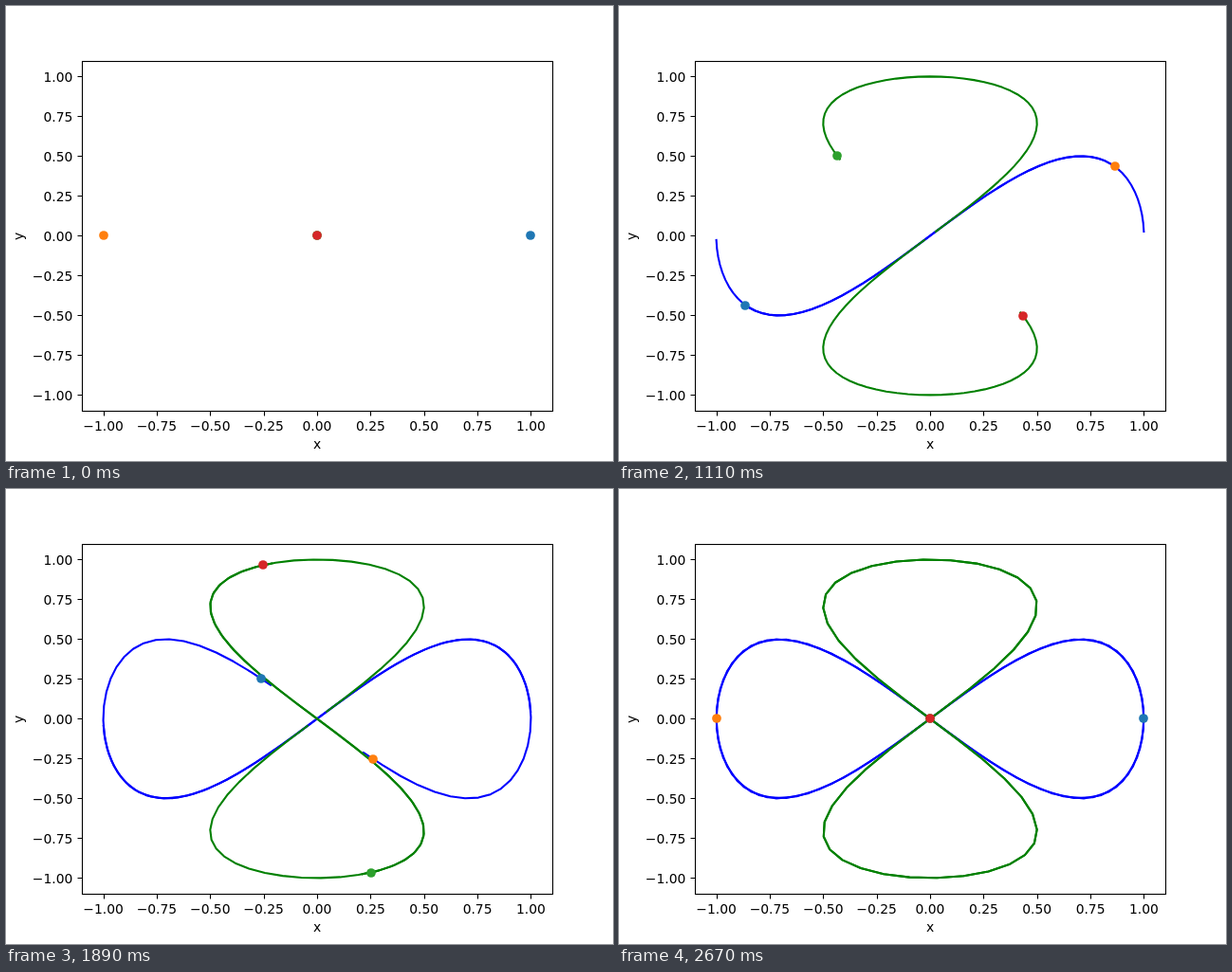
Animation of 640 by 480 pixels, one loop 2700 ms. Source, as an HTML page:

```html
<!DOCTYPE html>
<html lang="en">
<head>
<meta charset="utf-8">
<title>Crossing figure-eight orbits</title>
<style>
  html, body { margin: 0; width: 100%; height: 100%; overflow: hidden; background: #fff; }
  svg { display: block; }
  text { font: 13.889px "DejaVu Sans", sans-serif; fill: #000; }
  .axes { fill: none; stroke: #000; stroke-width: 1.111; }
  .trail { fill: none; stroke-width: 2.083; stroke-linejoin: round; stroke-linecap: square; }
</style>
</head>
<body>
<svg id="plot" width="640" height="480" viewBox="0 0 640 480">
  <path class="axes" id="ticks"/>
  <g id="trails"></g>
  <rect class="axes" x="80.5" y="58.5" width="496" height="369"/>
  <g id="dots"></g>
  <g id="labels">
    <text x="328" y="467" text-anchor="middle">x</text>
    <text transform="translate(18 243) rotate(-90)" text-anchor="middle">y</text>
  </g>
</svg>
<script>
const FRAMES = 90, FRAME_MS = 30, SEGMENTS = 49;
const $ = id => document.getElementById(id);
const px = x => 328 + x * 496 / 2.2;
const py = y => 242.4 - y * 168;

function add(parent, name, attrs, text = '') {
  const el = document.createElementNS('http://www.w3.org/2000/svg', name);
  for (const key in attrs) el.setAttribute(key, attrs[key]);
  el.textContent = text;
  return $(parent).appendChild(el);
}

function drawAxes() {
  let d = '';
  for (let i = -4; i <= 4; i++) {
    const v = i / 4;
    const label = (v < 0 ? '\u2212' : '') + Math.abs(v).toFixed(2);
    const x = Math.round(px(v)) + 0.5, y = Math.round(py(v)) + 0.5;
    d += `M${x} 427.5V432.5M80.5 ${y}H75.5`;
    add('labels', 'text', { x: px(v), y: 448, 'text-anchor': 'middle' }, label);
    add('labels', 'text', { x: 70.3, y: y + 5.5, 'text-anchor': 'end' }, label);
  }
  $('ticks').setAttribute('d', d);
}

const wide = t => [Math.cos(t), Math.sin(t) * Math.cos(t)];
const tall = t => [Math.sin(t) * Math.cos(t), Math.sin(t)];
const mirror = curve => t => curve(t).map(v => -v);

const bodies = [
  [wide, '#00f', '#1f77b4'],
  [mirror(wide), '#00f', '#ff7f0e'],
  [tall, '#008000', '#2ca02c'],
  [mirror(tall), '#008000', '#d62728']
].map(([at, stroke, fill]) => ({
  at,
  trail: add('trails', 'path', { class: 'trail', stroke }),
  dot: add('dots', 'circle', { r: 4.861, fill })
}));

// The trail is sampled half a step late, so it runs slightly past its dot.
function trailPath(at, t) {
  const points = [];
  for (let i = 0; i <= SEGMENTS; i++) {
    const [x, y] = at((i + 0.5) * t / SEGMENTS);
    points.push(px(x).toFixed(3) + ' ' + py(y).toFixed(3));
  }
  return 'M' + points.join('L');
}

function render(step) {
  const t = 2 * Math.PI * step / (FRAMES - 1);
  for (const { at, trail, dot } of bodies) {
    const [x, y] = at(t);
    trail.setAttribute('d', step ? trailPath(at, t) : '');
    dot.setAttribute('cx', Math.round(px(x)));
    dot.setAttribute('cy', Math.round(py(y)));
  }
}

let start, shown = 0;
function tick(now) {
  start ??= now;
  const step = Math.floor(Math.max(0, now - start) / FRAME_MS + 1e-6) % FRAMES;
  if (step !== shown) render(shown = step);
  requestAnimationFrame(tick);
}

drawAxes();
render(0);
requestAnimationFrame(tick);
</script>
</body>
</html>
```
